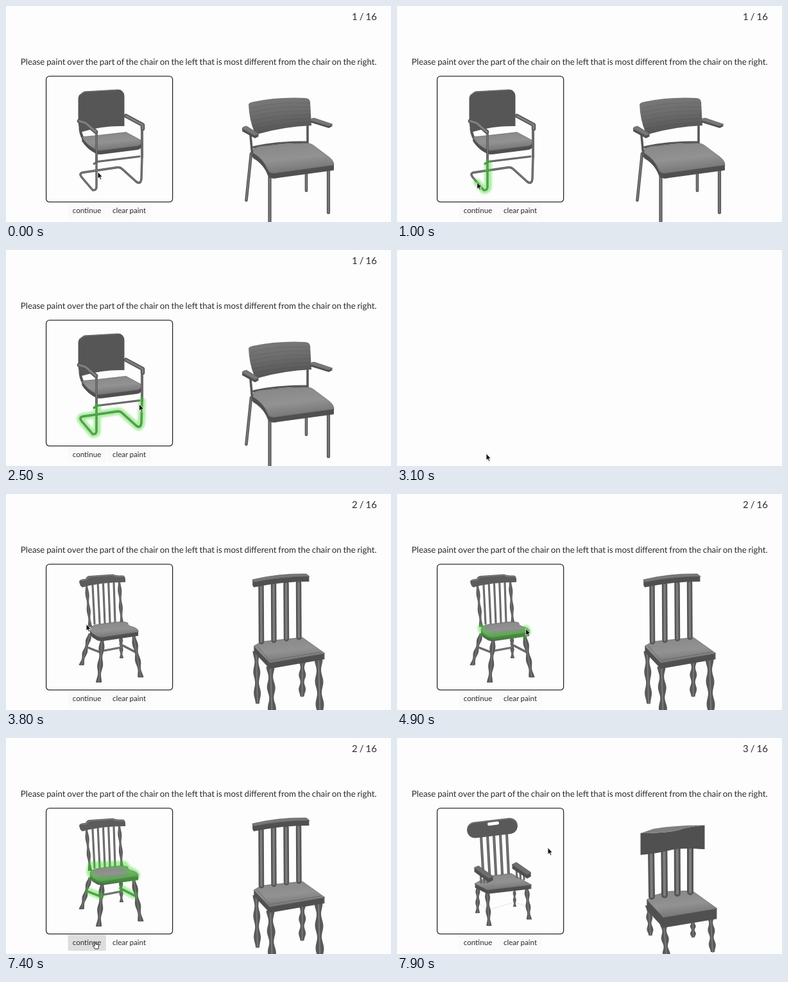
Animation of 600x338 px, one loop 8 s. Source, as an HTML page:

```html
<!DOCTYPE html>
<html lang="en">
<head>
<meta charset="utf-8">
<title>Chair painting task</title>
<style>
  html, body { margin: 0; width: 100%; height: 100%; overflow: hidden; background: #fefdfe; }
  svg { display: block; width: 600px; height: 338px; }
  text { font-family: Lato, sans-serif; fill: #2b2b2b; word-spacing: -.049em; text-rendering: geometricPrecision; }
  .bar { fill: none; stroke-linecap: round; stroke-linejoin: round; }
  #paint { opacity: .42; filter: blur(1.5px); fill: none; stroke: #38dc26; stroke-width: 11.5;
           stroke-linecap: round; stroke-linejoin: round; }
</style>
</head>
<body>
<svg viewBox="0 0 600 338">
  <defs>
    <linearGradient id="seat" x1="0" y1="0" x2=".3" y2="1">
      <stop offset="0" stop-color="#868686"/><stop offset=".6" stop-color="#929292"/><stop offset="1" stop-color="#777"/>
    </linearGradient>
    <linearGradient id="rest" x1="0" y1="0" x2=".2" y2="1">
      <stop offset="0" stop-color="#7b7b7b"/><stop offset=".5" stop-color="#6c6c6c"/><stop offset="1" stop-color="#545454"/>
    </linearGradient>
  </defs>
  <g id="page">
    <text id="count" x="578" y="21.7" font-size="15" text-anchor="end"></text>
    <text x="300.3" y="92.3" font-size="13.33" text-anchor="middle">Please paint over the part of the chair on the left that is most different from the chair on the right.</text>
    <rect id="next" x="96.5" y="308" width="59.5" height="25" rx="2"/>
    <rect x="158" y="308" width="68" height="25" rx="2" fill="#fafafa"/>
    <text x="126" y="324.3" font-size="11.6" text-anchor="middle">continue</text>
    <text x="192" y="324.3" font-size="11.6" text-anchor="middle">clear paint</text>
    <g id="chairs"></g>
    <g id="paint"></g>
    <rect x="62.6" y="109.9" width="197" height="196.8" rx="5" fill="none" stroke="#2a2a2a" stroke-width="1.3"/>
  </g>
  <g id="cursor" stroke="#fff" stroke-linejoin="round">
    <path id="arrow" d="M0 0V10.6L2.4 8.5L4 12.2L5.8 11.4L4.2 7.8H7.4Z" fill="#111" stroke-width=".8"/>
    <path id="hand" d="M-.8 .7Q0-.6 1 .7L1.7 4.2L5.4 5Q6.8 5.5 6.4 7.5L5.6 11.5H.8L-2.6 7.2Q-2.5 5.8-1.2 6.3L.2 7.4Z" fill="#fff" stroke="#222"/>
  </g>
</svg>
<script>
const $ = id => document.getElementById(id);
const svgPath = d => {
  const path = document.createElementNS('http://www.w3.org/2000/svg', 'path');
  path.setAttribute('d', d);
  return path;
};
const range = n => [...Array(n).keys()];
const clamp = k => Math.min(1, Math.max(0, k));
const mix = (a, b, k) => a + (b - a) * k;
const between = (p, q, k) => [mix(p[0], q[0], k), mix(p[1], q[1], k)];

// Drawing helpers, each returning SVG markup
const shape = (fill, d) => `<path d="${d}" fill="${fill}"/>`;
const bar = (color, width, d) => `<path class="bar" d="${d}" stroke="${color}" stroke-width="${width}"/>`;
const tube = (width, d) => bar('#555', width, d) + bar('#7d7d7d', width * .4, d);

// A flat top with its own outline repeated downwards as the side
const slab = (height, d, top = 'url(#seat)', side = '#505050') =>
  range(height).map(i => `<path d="${d}" fill="${side}" transform="translate(0 ${height - i})"/>`).join('') +
  `<path d="${d}" fill="${top}" stroke="#606060" stroke-width=".7"/>`;

// Evenly spaced rods from one edge (a to b) to another (c to d)
const rods = (n, width, a, b, c, d) => range(n).map(i => {
  const k = i / (n - 1);
  return tube(width, `M${between(a, b, k)}L${between(c, d, k)}`);
}).join('');

// Lathe-turned post: the width swells and narrows along its length
function turned(width, from, to, phase = 0) {
  const steps = range(25).map(i => i / 24);
  const edge = side => steps.map(k => {
    const [x, y] = between(from, to, k);
    return `${x + side * width * (.27 + .23 * Math.sin(2.5 * Math.PI * k + phase) ** 2)} ${y}`;
  });
  return shape('#595959', `M${edge(-1).concat(edge(1).reverse()).join('L')}Z`) +
    bar('#7a7a7a', width * .16, `M${from}L${to}`);
}
const squareTop = Math.PI / 2;

const sled = 'V283Q141 289 135 288L118 268Q113 262 120 260.500L174 252.500Q178 252 181 255L203 275Q210 280 211 270L212 236';

const cantilever = [
  tube(3, 'M137 247L143 243.500L208 235.500'),
  tube(3.4, `M141 202${sled}V196`),
  bar('#555', 4, 'M115.500 186Q114 212 142 228'),
  slab(6, 'M118 205L143 202.500L187 197.500L212 211Q211 218 205 219L150 226Q142 227 140 225Q126 218 118 205Z'),
  shape('#565656', 'M112.500 145Q112 139 122 133.500L174 130.500Q184 131 184.500 141V188Q150 187 118 197Q113 191 112.500 181Z'),
  bar('#727272', 1.1, 'M114 140L122 134.500L174 131.500'),
  tube(3.4, 'M141 198V244M212 190V236'),
  ...['M114 180L124 183L140 197', 'M187 172L213 186V192'].map(d => bar('#555', 6.5, d) + bar('#808080', 3, d)),
];

const armchair = [
  tube(4.6, 'M382 231L374.500 304M468 263V289'),
  bar('#575757', 3.6, 'M381 202L384 235M470 188V216M386 221Q420 213 470 213'),
  shape('url(#rest)', 'M378 154Q379 151 385 150Q424 142 466 144Q473 144 474 150L476 187Q432 189 394 200Q389 202 387 197Q379 178 378 154Z'),
  '<g opacity=".22">' + range(6).map(i =>
    bar('#333', .7, `M${381 + i} ${160 + i * 6.5}Q425 ${149 + i * 7} 474 ${152 + i * 6}`)).join('') + '</g>',
  slab(4, 'M368 192Q368 189 375 188L394 200L388 203Z', '#777'),
  slab(3, 'M474 179Q475 175 481 175.500L509 185L503 188Z', '#777'),
  tube(5.2, 'M411 265V340M502.500 257V323'),
  slab(8, 'M385 225Q388 220 400 219L464 214.500Q474 214 479 218L503 236Q511 242 511 249L424 261Q411 264 408 257Q402 240 385 230Z'),
];

const windsor = [
  turned(6, [179, 222], [180, 257]),
  turned(8, [131, 218], [117.5, 268]),
  tube(3.2, 'M127 240L150 249M148 246L180 240M178 235L201 247'),
  turned(9, [150, 227], [144.5, 295]),
  turned(9, [199, 222], [210, 287]),
  rods(5, 3, [135, 143], [168, 139], [138, 203], [170, 200]),
  turned(6, [125.5, 144], [131, 208]),
  turned(6, [176.5, 138], [180.5, 204]),
  shape('#5c5c5c', 'M114 137Q115 133 124 133Q126 128 131 128L167 125.500Q171 128 183 127.500Q187 130 186 138Q148 138 119 146Q115 144 114 137Z'),
  bar('#7a7a7a', 1.6, 'M117 135L125 134.500Q128 130 132 129.500L167 127Q171 130 183 129'),
  slab(6, 'M131 211Q132 206 143 204L170 200.500Q187 199 190 202Q189 206 198 208Q207 211 206 216L152 224Q144 225 139 221Q131 217 131 211Z'),
];

const slatback = [
  turned(11, [462, 260], [461.5, 317], squareTop),
  turned(11, [390, 246], [392, 328], squareTop),
  turned(13, [412, 270], [415, 352], squareTop),
  turned(13, [487, 258], [489.5, 347], squareTop),
  slab(9, 'M386 238L398 231L462 224.500L497 249.500L411 264.500Z'),
  bar('#686868', 1, 'M392 238.500L411 260.500L490 247.500'),
  rods(4, 8.5, [397.5, 143], [456, 139], [398, 231], [456.5, 224]),
  slab(8, 'M384 134Q426 124 468 125L473 129Q430 129 386 138Z', '#777'),
];

const nursery = [
  bar('#ddd', .8, 'M126 258L142 269L183 257L204 264'),
  turned(5, [183, 238], [183.5, 264]),
  turned(7, [126, 232], [125.5, 274]),
  rods(5, 4, [131, 154], [171, 150], [134.5, 215], [174, 214]),
  turned(8, [140.5, 238], [143.5, 294]),
  turned(8, [202, 234], [206, 284]),
  slab(6, 'M121 228L143 216L178 212L210 230L141 238Z'),
  rods(3, 3, [130, 209], [143, 218], [131, 226], [141, 226]),
  rods(3, 3, [186, 206], [198, 213], [187, 218], [198, 221]),
  slab(6, 'M120 203L127 200L150 216.500L143 220Z', '#6e6e6e'),
  slab(6, 'M179 198L186 194.500L209 210.500L203 214Z', '#6e6e6e'),
  bar('#737373', 24, 'M121 143.500L176 137'),
  bar('#595959', 23, 'M121 145L176 138.500'),
  bar('#fefdfe', 5, 'M143.500 134.700L156.500 133'),
];

const tavern = [
  turned(9, [461, 283], [461.5, 312], squareTop),
  turned(10, [392, 262], [395, 309], squareTop),
  turned(12, [415.5, 290], [421, 350], squareTop),
  turned(11, [488.5, 278], [492, 335], squareTop),
  slab(16, 'M389 253L402 246L424 240L460 239L499 267L415 281Z'),
  rods(4, 10, [396, 176], [457, 170], [397, 248], [457, 241]),
  shape('#505050', 'M379.500 149Q428 149 445 142Q458 138 479.500 136.500V174Q440 171 424 176Q404 181 379.500 183Z'),
  shape('#808080', 'M379.500 149L400 142Q436 136 479.500 136.500Q458 138 445 142Q428 149 379.500 149Z'),
];

const scenes = [[0, cantilever, armchair], [3200, windsor, slatback], [7700, nursery, tavern]]
  .map(([start, left, right]) => ({ start, markup: [...left, ...right].join('') }));
const sceneAt = t => scenes.findLastIndex(scene => t >= scene.start);

// Pointer moves: a path followed at even speed, painting or not; straight glides join them
const rest = (from, to, x, y) => ({ from, to, d: `M${x} ${y}h.1` });
const stroke = (from, to, d) => ({ from, to, d, paints: true });
const moves = [
  rest(0, 100, 143, 259.5),
  stroke(420, 2480, `M142 246${sled}`),
  rest(2800, 3200, 139, 318.5),
  rest(3500, 3800, 125, 203.5),
  stroke(3950, 5800, 'M131 209Q132 219 150 223L202 218Q207 211 190 206L185 198L133 199L131 207'),
  rest(6000, 6050, 145.5, 211),
  stroke(6200, 6450, 'M130 240L147 247'),
  stroke(6700, 6950, 'M181 236L199 246'),
  rest(7250, 7500, 138, 318.5),
  rest(7900, 8000, 235, 171.5),
];
for (const move of moves) {
  move.path = svgPath(move.d);
  move.length = move.path.getTotalLength();
  if (move.paints) $('paint').append(move.path);
}
const progress = (move, t) => clamp((t - move.from) / (move.to - move.from));
const pointOn = (move, k) => {
  const { x, y } = move.path.getPointAtLength(move.length * k);
  return [x, y];
};

function pointer(t) {
  const i = moves.findLastIndex(move => t >= move.from);
  const move = moves[i], next = moves[i + 1];
  if (t <= move.to || !next) return pointOn(move, progress(move, t));
  return between(pointOn(move, 1), pointOn(next, 0), (t - move.to) / (next.from - move.to));
}

const within = (spans, t) => spans.some(([from, to]) => t >= from && t < to);
const blanks = [[3100, 3300], [7600, 7800]];
const hovers = [[2800, 3100], [7200, 7600]];
const show = (element, on) => { element.style.display = on ? '' : 'none'; };

let lastTime, lastScene;
function draw(t) {
  const scene = sceneAt(t);
  if (scene !== lastScene) {
    $('chairs').innerHTML = scenes[scene].markup;
    $('count').textContent = `${scene + 1} / 16`;
    lastScene = scene;
  }
  for (const move of moves.filter(move => move.paints)) {
    show(move.path, t > move.from && sceneAt(move.from) === scene);
    move.path.setAttribute('stroke-dasharray', `${move.length * progress(move, t)} ${move.length + 1}`);
  }
  const hover = within(hovers, t);
  show($('page'), !within(blanks, t));
  show($('hand'), hover);
  show($('arrow'), !hover);
  $('next').setAttribute('fill', hover ? '#dedede' : '#fafafa');
  $('cursor').setAttribute('transform', `translate(${pointer(t)})`);
}

function tick() {
  const t = Math.floor(performance.now() % 8000 / 100) * 100;
  if (t !== lastTime) draw(lastTime = t);
  requestAnimationFrame(tick);
}
tick();
</script>
</body>
</html>
```
